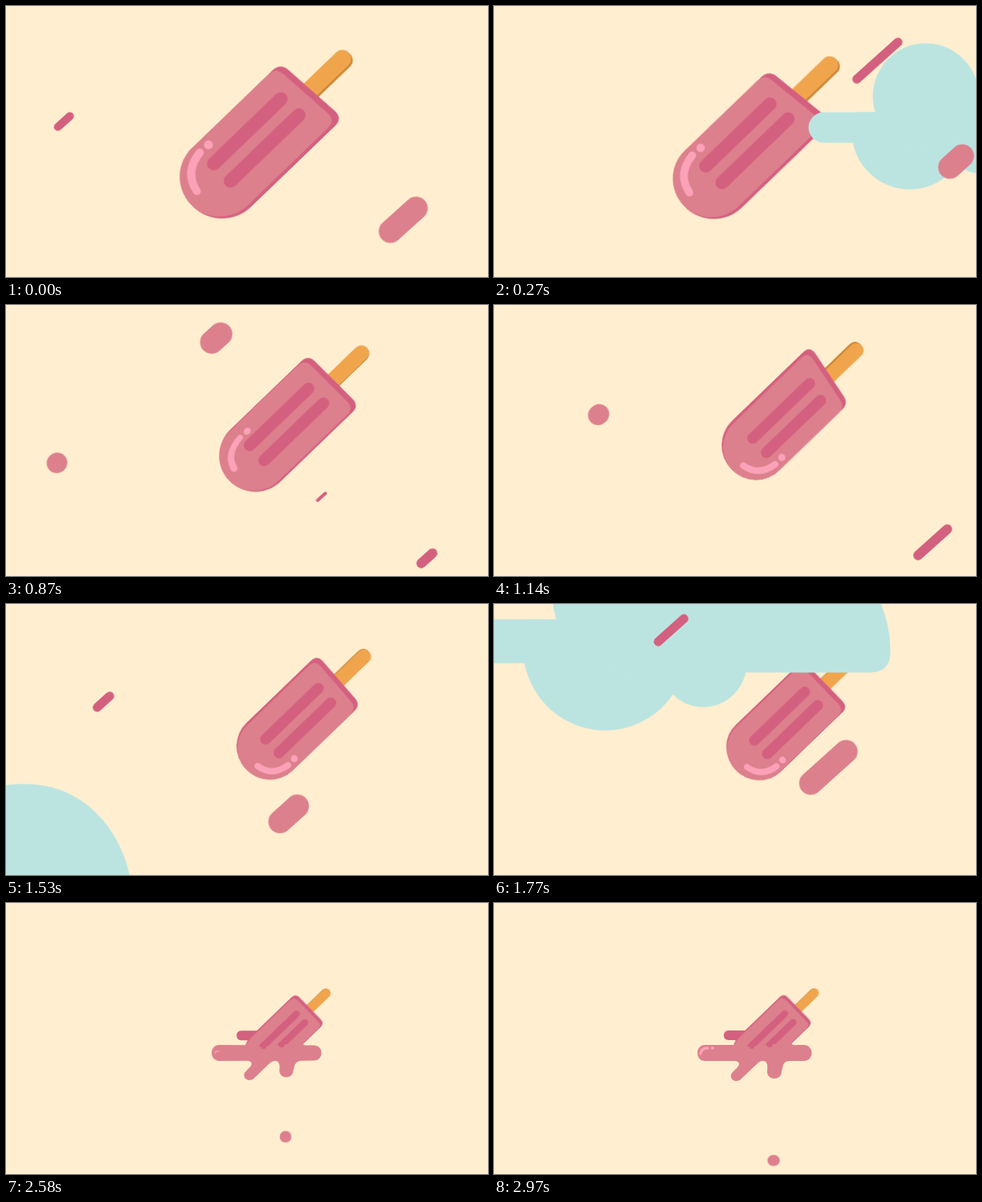
Animation of 600x338 px, one loop 3 s. Source, as an HTML page:

```html
<!DOCTYPE html>
<html lang="en">
<head>
<meta charset="utf-8">
<title>Falling popsicle</title>
<style>
  @property --tilt { syntax: "<number>"; inherits: true; initial-value: 0; }

  :root {
    --cream: #ffeecf; --pink: #dd808d; --rose: #d4607f; --shine: #fba2b8;
    --sky: #bbe4e1; --wood: #f0a54d; --wood-dark: #c98738;
  }
  html, body { margin: 0; width: 600px; height: 338px; overflow: hidden; background: var(--cream); }
  body { position: relative; }
  svg, .layer { position: absolute; left: 0; top: 0; width: 600px; height: 338px; }
  .layer { overflow: hidden; }
  .pink { fill: var(--pink); }
  .rose { fill: var(--rose); }
  .shine { fill: var(--shine); }
  .shine-line { fill: none; stroke: var(--shine); stroke-linecap: round; }

  /* Popsicle */
  #ice { animation: sink 3s step-end infinite; }
  @keyframes sink { 0% { clip-path: inset(0); } 70%, 100% { clip-path: inset(0 0 156px 0); } }

  #pop { animation: fall 3s linear infinite, tilt 3s ease-in-out infinite; }
  @keyframes fall {
    0%   { transform: translate(269px, 213px) rotate(-44deg) scale(1, 1); }
    9%   { transform: translate(273.5px, 215.5px) rotate(-44deg) scale(.965, .965); }
    21%  { transform: translate(297px, 199px) rotate(-44deg) scale(.92, .91); }
    38%  { transform: translate(326px, 175px) rotate(-44deg) scale(.82, .82); }
    59%  { transform: translate(329px, 180px) rotate(-44deg) scale(.75, .78); animation-timing-function: ease-in; }
    70%  { transform: translate(318px, 190px) rotate(-44deg) scale(.5, .5); }
    73%  { transform: translate(320px, 188px) rotate(-44deg) scale(.5, .5); animation-timing-function: ease-out; }
    90%, 100% { transform: translate(323px, 185px) rotate(-44deg) scale(.5, .5); }
  }
  @keyframes tilt {
    0%, 9% { --tilt: -4; }
    21%  { --tilt: -6; }
    38%  { --tilt: 4; }
    59%, 100% { --tilt: 1.5; }
  }
  .stick { width: 91px; height: 22px; }
  #stick-front { transform: translateY(calc(var(--tilt) * .5px)); }
  #stick-side { transform: translateY(calc(var(--tilt) * -.2px)); }
  #face { transform: translate(-2px, calc(var(--tilt) * .55px)); }
  #grooves {
    transform: translate(2px, calc(var(--tilt) * .45px));
    stroke: var(--rose); stroke-width: 17; stroke-linecap: round;
    animation: grooves 3s ease-in-out infinite;
  }
  /* The flat end leans as the bar turns; the round end keeps its shape. */
  .body { animation: lean 3s ease-in-out infinite; }
  @keyframes lean {
    0%   { d: path("M0 -52L137 -52Q151 -52 152 -38L158 38Q159 52 145 52L0 52A52 52 0 0 1 0 -52Z"); }
    21%  { d: path("M0 -52L132 -52Q146 -52 148 -38L162 38Q164 52 150 52L0 52A52 52 0 0 1 0 -52Z"); }
    38%  { d: path("M0 -52L150 -52Q164 -52 162 -38L148 38Q146 52 132 52L0 52A52 52 0 0 1 0 -52Z"); }
    59%, 100% { d: path("M0 -52L141 -52Q155 -52 155 -38L155 38Q155 52 141 52L0 52A52 52 0 0 1 0 -52Z"); }
  }
  @keyframes grooves {
    0%   { d: path("M4 -15L120 -15M4 15L122 15"); }
    21%  { d: path("M4 -15L118 -15M4 15L124 15"); }
    38%  { d: path("M4 -15L124 -15M4 15L118 15"); }
    59%, 100% { d: path("M4 -15L121 -15M4 15L121 15"); }
  }
  #gloss { animation: gloss 3s ease-in-out infinite; }
  @keyframes gloss { 0%, 28% { transform: scaleY(1); } 33%, 100% { transform: scaleY(-1); } }

  /* Clouds and speed streaks */
  #sky { animation: sky 3s step-end infinite; }
  @keyframes sky { 0% { opacity: 1; } 70%, 100% { opacity: 0; } }

  .cloud { fill: var(--sky); animation: drift 3s linear var(--at) infinite both; }
  @keyframes drift {
    0% { translate: calc(-1 * var(--dx)) calc(-1 * var(--dy)); }
    24%, 100% { translate: var(--dx) var(--dy); }
  }

  .pill {
    position: absolute; left: var(--x); top: var(--y); width: var(--l); height: var(--w);
    border-radius: 99px; background: var(--pink);
  }
  .dark { background: var(--rose); }
  .streak { animation: rush 3s linear var(--at) infinite both, stretch 3s var(--at) infinite both; }
  @keyframes rush {
    0%   { transform: translate(-50%, -50%) rotate(-42deg) translateX(calc(-1 * var(--v))) scale(0); }
    3%   { transform: translate(-50%, -50%) rotate(-42deg) translateX(calc(-.75 * var(--v))) scale(1); }
    21%  { transform: translate(-50%, -50%) rotate(-42deg) translateX(calc(.75 * var(--v))) scale(1); }
    24%, 100% { transform: translate(-50%, -50%) rotate(-42deg) translateX(var(--v)) scale(0); }
  }
  @keyframes stretch {
    0%  { width: var(--w); animation-timing-function: ease-out; }
    12% { width: var(--l); animation-timing-function: ease-in; }
    24%, 100% { width: var(--w); }
  }

  /* Landing */
  .shock { animation: shock 3s linear infinite; }
  @keyframes shock {
    0%, 69.99% { opacity: 0; }
    70% { opacity: 1; width: var(--w); transform: translate(-50%, -50%) translateX(calc(-.6 * var(--v))); }
    73% { width: var(--l); transform: translate(-50%, -50%); animation-timing-function: ease-out; }
    82% { opacity: 1; width: var(--w); transform: translate(-50%, -50%) translateX(var(--v)); }
    82.01%, 100% { opacity: 0; }
  }

  .melt { transform-origin: 325px 188px; animation: melt 3s linear infinite; }
  @keyframes melt {
    0%, 69.99% { opacity: 0; transform: scale(.4); }
    70% { opacity: 1; transform: scale(.4); }
    73%, 100% { opacity: 1; transform: none; }
  }
  #puddle { animation: puddle 3s ease-out infinite; }
  @keyframes puddle {
    0%, 73% { d: path("M296 178L299 179L310 180L360 180Q361 181 361 182L362 184C362 188 361 191 360 192L359 194Q358 198 355 199L353 199C350 200 346 199 344 198Q340 196 337 197Q332 198 330 199L323 207C317 211 310 208 312 201L314 198Q314 194 306 195L297 196C284 198 285 178 296 178Z"); }
    90%, 100% { d: path("M263 177L297 177L308 180L370 174Q371 178 377 177L385 177C399 177 399 197 385 197L368 197Q360 197 359 206L358 210C358 222 340 222 340 210Q342 196 334 197Q331 197 327 201L307 220C299 226 291 217 297 211L303 205Q308 199 301 197L263 197C250 197 250 177 263 177Z"); }
  }
  #lobe { animation: lobe 3s ease-out infinite; }
  @keyframes lobe {
    0%, 73% { d: path("M303 162L312 162L312 176L303 178Q306 176 304 174L304 174C296 174 297 162 303 162Z"); }
    90%, 100% { d: path("M292 159L314 159L314 176L303 177Q307 171 299 171L292 171C284 171 284 159 292 159Z"); }
  }
  #drips { animation: drips 3s ease-out infinite; }
  @keyframes drips { 0%, 73% { transform: translate(-1.5px, 2px); } 90%, 100% { transform: none; } }

  #glint { transform-origin: 262px 187px; animation: glint 3s ease-out infinite; }
  @keyframes glint { 0%, 84% { transform: scale(0); } 92%, 100% { transform: none; } }

  #drop { animation: drop 3s infinite; }
  @keyframes drop {
    0%, 77.99% { opacity: 0; transform: translate(348px, 210px); }
    78% { opacity: 1; transform: translate(348px, 210px); animation-timing-function: ease-in; }
    88% { transform: translate(348px, 327px) scale(1, 1); animation-timing-function: ease-out; }
    93% { transform: translate(348px, 317px) scale(.98, 1.04); animation-timing-function: ease-in-out; }
    99%, 100% { opacity: 1; transform: translate(348px, 321px) scale(1.06, .96); }
  }
</style>
</head>
<body>
<svg viewBox="0 0 600 338">
  <defs>
    <g id="cloud">
      <rect x="-63" y="-7" width="75" height="19" rx="9.5"/>
      <path d="M-33.9 12A36 36 0 1 1 33.9 12Z"/>
      <circle cx="10" cy="22" r="33"/>
      <circle cx="43" cy="-7" r="19"/>
      <path d="M30-11H116Q125-11 125-2C125 22 108 49 78 49C60 49 46 43 38 28Z"/>
    </g>
  </defs>
  <g class="melt"><path id="lobe" class="rose"/></g>
</svg>

<svg id="ice" viewBox="0 0 600 338">
  <g id="pop">
    <rect id="stick-side" class="stick" x="130" y="-11" rx="11" fill="var(--wood-dark)"/>
    <rect id="stick-front" class="stick" x="130" y="-11" rx="11" fill="var(--wood)"/>
    <path class="body rose"/>
    <g id="face">
      <g transform="scale(.96)"><path class="body pink"/></g>
      <path id="grooves"/>
    </g>
    <g id="gloss">
      <path class="shine-line" stroke-width="10" d="M1-41Q-30-37-35-9"/>
      <circle class="shine" cx="15.5" cy="-40.5" r="5.5"/>
    </g>
  </g>
</svg>

<div class="layer">
  <div class="pill shock dark" style="--x:255.5px; --y:171px; --l:61px; --w:5px; --v:-95px"></div>
  <div class="pill shock" style="--x:247.5px; --y:190px; --l:65px; --w:12px; --v:-95px"></div>
  <div class="pill shock dark" style="--x:425.5px; --y:175.5px; --l:75px; --w:5px; --v:84px"></div>
  <div class="pill shock" style="--x:389.5px; --y:190px; --l:57px; --w:12px; --v:84px"></div>
</div>

<svg viewBox="0 0 600 338">
  <circle id="drop" class="pink" r="7.3"/>
  <g class="melt">
    <path id="puddle" class="pink"/>
    <g id="drips" class="rose">
      <circle cx="321" cy="178.5" r="3.4"/>
      <circle cx="343" cy="176.5" r="3.6"/>
    </g>
    <g id="glint">
      <path class="shine-line" stroke-width="3.5" d="M257 188Q258 181 266 181"/>
      <circle class="shine" cx="272" cy="181" r="2"/>
    </g>
  </g>
</svg>

<div id="sky" class="layer">
  <svg viewBox="0 0 600 338">
    <use href="#cloud" class="cloud" transform="translate(516 158) scale(2 -2)" style="--at:-90ms; --dx:540px; --dy:-504px"/>
    <use href="#cloud" class="cloud" transform="translate(72 73)" style="--at:270ms; --dx:252px; --dy:-234px"/>
    <use href="#cloud" class="cloud" transform="translate(137 55) scale(2.84 -2.88)" style="--at:1410ms; --dx:504px; --dy:-468px"/>
  </svg>
  <div class="pill streak dark" style="--x:10px; --y:200px; --l:43px; --w:10px; --v:150px; --at:-560ms"></div>
  <div class="pill streak" style="--x:503px; --y:259px; --l:72px; --w:29px; --v:145px; --at:-330ms"></div>
  <div class="pill streak dark" style="--x:514px; --y:35px; --l:87px; --w:11px; --v:200px; --at:0ms"></div>
  <div class="pill streak" style="--x:162px; --y:130.5px; --l:59px; --w:29px; --v:200px; --at:270ms"></div>
  <div class="pill streak dark" style="--x:343px; --y:284px; --l:31px; --w:4px; --v:100px; --at:270ms"></div>
  <div class="pill streak" style="--x:130px; --y:137px; --l:27px; --w:25px; --v:120px; --at:780ms"></div>
  <div class="pill streak dark" style="--x:546px; --y:295.5px; --l:61px; --w:12px; --v:40px; --at:780ms"></div>
  <div class="pill streak dark" style="--x:220px; --y:32.5px; --l:54px; --w:11px; --v:200px; --at:1410ms"></div>
  <div class="pill streak" style="--x:416px; --y:203.5px; --l:88px; --w:29px; --v:130px; --at:1410ms"></div>
</div>
</body>
</html>
```
